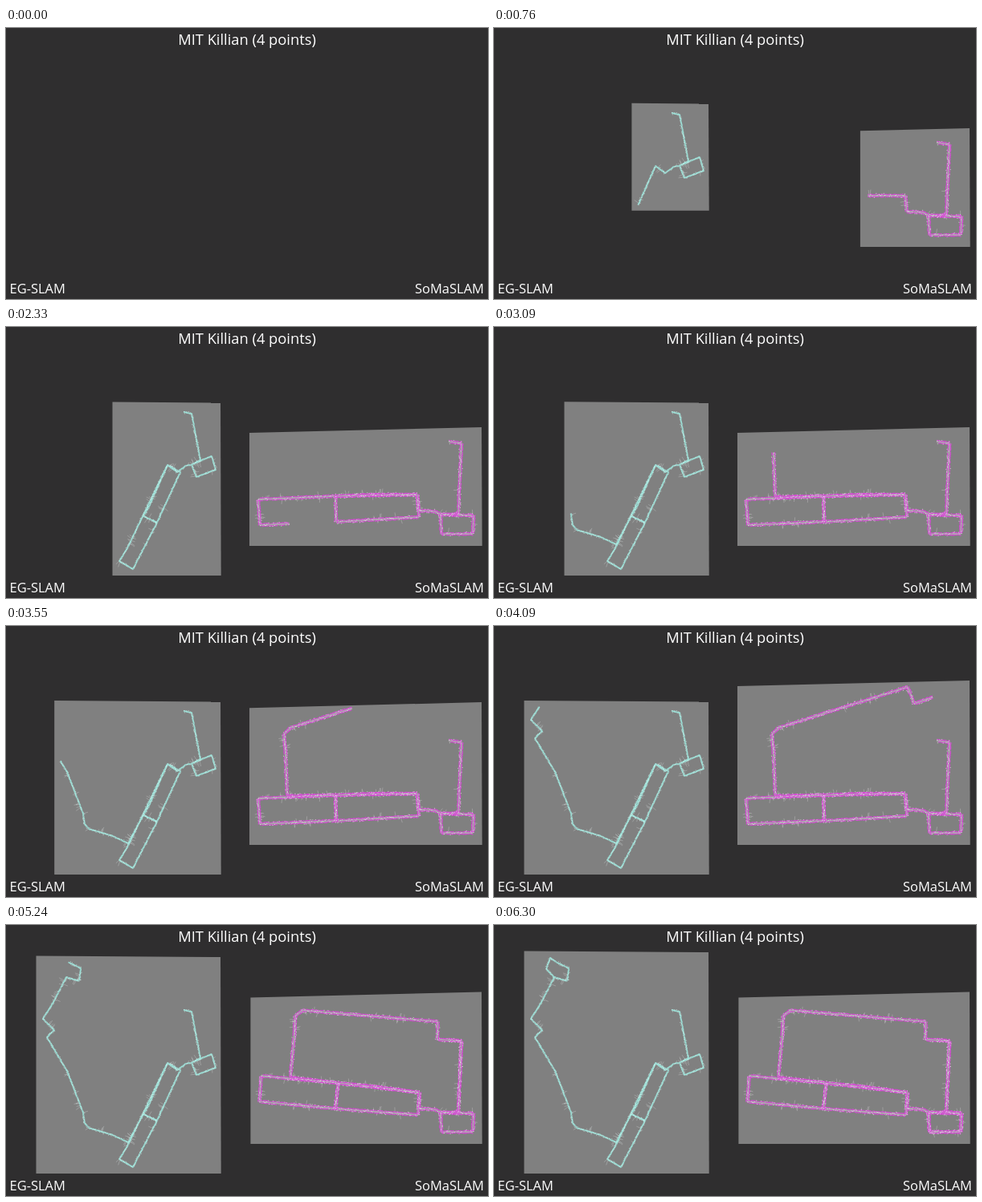
Write an HTML page that moves like this. It is 600 px wide and 338 px high and loops after 6330 ms.

```html
<!DOCTYPE html>
<html lang="en">
<head>
<meta charset="utf-8">
<title>SLAM comparison</title>
<style>
  html, body { margin: 0; width: 100%; height: 100%; overflow: hidden; background: #2f2e2f; }
  svg { display: block; width: 600px; height: 338px; }
  text { font-family: "Open Sans", "Noto Sans", sans-serif; font-size: 16.5px; fill: #fff; }
  path { fill: none; }
</style>
</head>
<body>
<svg viewBox="0 0 600 338">
  <rect width="600" height="338" fill="#2f2e2f"/>
  <g id="maps"></g>
  <text x="300" y="20.5" text-anchor="middle" style="font-size:18.3px">MIT Killian (4 points)</text>
  <text x="4.5" y="330.5">EG-SLAM</text>
  <text x="595" y="330.5" text-anchor="end">SoMaSLAM</text>
</svg>
<script>
const LOOP = 6330, START = 60, TICK = 30, STEP = 1.2;

// The robot drives each leg at constant speed and ends it at time `until`.
// A third value on a point is the angle by which closing the loop turns the track after it.
// `view` is the first scanned area as left, top, right, bottom; topPad is [open, closed].
const left = {
  closeAt: Infinity, view: [210, 94.5, 267, 150], pad: 8.5, padRight: 6, padBottom: 8, topPad: [7, 7],
  tilt: -.007, walls: [0], spread: 3.5,
  colors: { ray: '#d0d6d4', band: '#9ccfc8', wall: '#9ee9df', speck: '#d2f3ee' },
  start: [221, 106],
  legs: [
    { until: 760, via: [[231, 108], [242, 166], [231, 172], [237, 187], [261, 178], [256, 161],
      [231, 172], [224, 173], [213, 181], [201, 172], [178, 224]] },
    { until: 1700, via: [[171, 236], [188, 244], [217, 181], [201, 172], [151, 276]] },
    { until: 2610, via: [[141, 292], [158, 302], [188, 244], [171, 236], [152, 271]] },
    { until: 3090, via: [[133, 262], [103, 253], [98, 247], [96, 234]] },
    { until: 4090, via: [[76, 182], [51, 140], [60, 131], [46, 117], [57, 100]] },
    { until: 5240, via: [[75, 65], [91, 70], [93, 54], [77, 46]] },
    { until: 5880, via: [[70, 41], [65, 55], [75, 65]] }
  ]
};

const right = {
  closeAt: 4350, view: [530, 125, 592, 200], pad: 11, padRight: 10, padBottom: 15, topPad: [8, 23],
  tilt: .0245, walls: [-1.5, 1.5], spread: 5.5,
  colors: { ray: '#d2d0d2', band: '#cdbfcd', wall: '#dc46dc', speck: '#f4ebf4' },
  start: [551, 143],
  legs: [
    { until: 760, via: [[567, 145], [563, 233], [541, 234], [542, 258], [581, 258], [582, 235],
      [541, 234], [534, 230], [514, 229, .135], [512, 209], [461, 209]] },
    { until: 1700, via: [[410, 211], [411, 243], [514, 237], [512, 209], [405, 211]] },
    { until: 3090, via: [[314, 215], [316, 247], [411, 243], [410, 211], [350, 212], [348, 158]] },
    { until: 4090, via: [[346, 135], [354, 127, .255], [515, 76], [523, 97], [548, 88]] },
    { until: 6000, via: [[567, 145], [563, 233], [582, 235], [581, 258], [542, 258], [541, 234]] }
  ]
};

const lerp = (a, b, k) => a + (b - a) * k;
const fix = v => v.toFixed(1);
const gap = (a, b) => Math.hypot(b.x - a.x, b.y - a.y);
const noise = (i, k) => {
  const v = Math.sin(i * 12.9898 + k * 78.233) * 43758.5453;
  return v - Math.floor(v);
};

function add(parent, tag, attrs) {
  const el = document.createElementNS('http://www.w3.org/2000/svg', tag);
  for (const key in attrs) el.setAttribute(key, attrs[key]);
  return parent.appendChild(el);
}

function drive({ start, legs }) {
  const track = [{ x: start[0], y: start[1], t: START }];
  for (const { until, via } of legs) {
    const first = track[track.length - 1];
    let length = 0, last = first;
    const points = via.map(([x, y, turn]) => {
      const p = { x, y, turn };
      p.done = length += gap(last, p);
      return last = p;
    });
    for (const p of points) track.push({ ...p, t: lerp(first.t, until, p.done / length) });
  }
  return track;
}

function closeLoop(track, closeAt) {
  const bent = track.map(p => ({ ...p }));
  for (let n = bent.length - 1; n >= 0; n--) {
    const { x, y, turn } = bent[n];
    if (!turn) continue;
    const c = Math.cos(turn), s = Math.sin(turn);
    for (const p of bent.slice(n + 1).filter(p => p.t < closeAt)) {
      const dx = p.x - x, dy = p.y - y;
      p.x = x + dx * c - dy * s;
      p.y = y + dx * s + dy * c;
    }
  }
  return bent;
}

// Breaks a track into short timed marks: walls, bright specks and clumps of stray rays.
function survey(track, { walls, spread }) {
  const marks = [];
  for (let n = 1; n < track.length; n++) {
    const a = track[n - 1], b = track[n], length = gap(a, b);
    const ux = (b.x - a.x) / length, uy = (b.y - a.y) / length;
    const count = Math.ceil(length / STEP);
    for (let j = 0; j < count; j++) {
      const i = marks.length, k = j / count;
      const x = lerp(a.x, b.x, k), y = lerp(a.y, b.y, k);
      const jitter = (seed, range) => (noise(i, seed) - .5) * range;
      const piece = (off, along, across = 0) =>
        `M${fix(x - uy * off)} ${fix(y + ux * off)}l${fix(ux * along - uy * across)} ${fix(uy * along + ux * across)}`;
      const clump = noise(Math.floor(i / 6), n) < .16;
      marks.push({
        x, y, t: lerp(a.t, b.t, k),
        band: piece(0, STEP + .3),
        wall: walls.map((off, w) => noise(i, w + 1) < .12 ? '' : piece(off + jitter(w + 3, 1), STEP + .5)).join(''),
        speck: noise(i, 7) < .6 ? piece(jitter(8, spread), 1.1) : '',
        ray: clump || noise(i, 9) < .05 ? piece(0, jitter(10, 4), jitter(11, 15)) : ''
      });
    }
  }
  return marks;
}

function outline(map, seen, closed) {
  let [l, top, r, b] = map.view;
  // Closing the loop moves marks, so every extent is taken afresh.
  for (const { x, y } of seen) {
    l = Math.min(l, x - map.pad);
    r = Math.max(r, x + map.padRight);
    b = Math.max(b, y + map.padBottom);
    top = Math.min(top, y - map.topPad[closed]);
  }
  return [l, top + map.tilt * (r - l), r, top, r + .7, b, l, b].map(fix).join(' ');
}

const root = document.getElementById('maps');
const maps = [left, right];
for (const map of maps) {
  const { colors, closeAt } = map;
  map.group = add(root, 'g', {});
  map.panel = add(map.group, 'polygon', { fill: '#808080' });
  const layer = (name, width, opacity) =>
    add(map.group, 'path', { stroke: colors[name], 'stroke-width': width, opacity });
  map.layers = {
    ray: layer('ray', .8, .45),
    band: layer('band', 2.2, .6),
    wall: layer('wall', 1.15, .9),
    speck: layer('speck', .85, .75)
  };
  const track = drive(map);
  map.surveys = [track, closeLoop(track, closeAt)].map(path => survey(path, map));
}

function render(t) {
  for (const map of maps) {
    const closed = +(t >= map.closeAt);
    const seen = map.surveys[closed].filter(mark => mark.t <= t);
    map.group.setAttribute('visibility', t < START ? 'hidden' : 'visible');
    map.panel.setAttribute('points', outline(map, seen, closed));
    for (const name in map.layers)
      map.layers[name].setAttribute('d', seen.map(mark => mark[name]).join(''));
  }
}

const origin = performance.now();
function tick() {
  const t = (performance.now() - origin) % LOOP;
  render(Math.floor(t / TICK) * TICK);
  requestAnimationFrame(tick);
}
tick();
</script>
</body>
</html>
```
